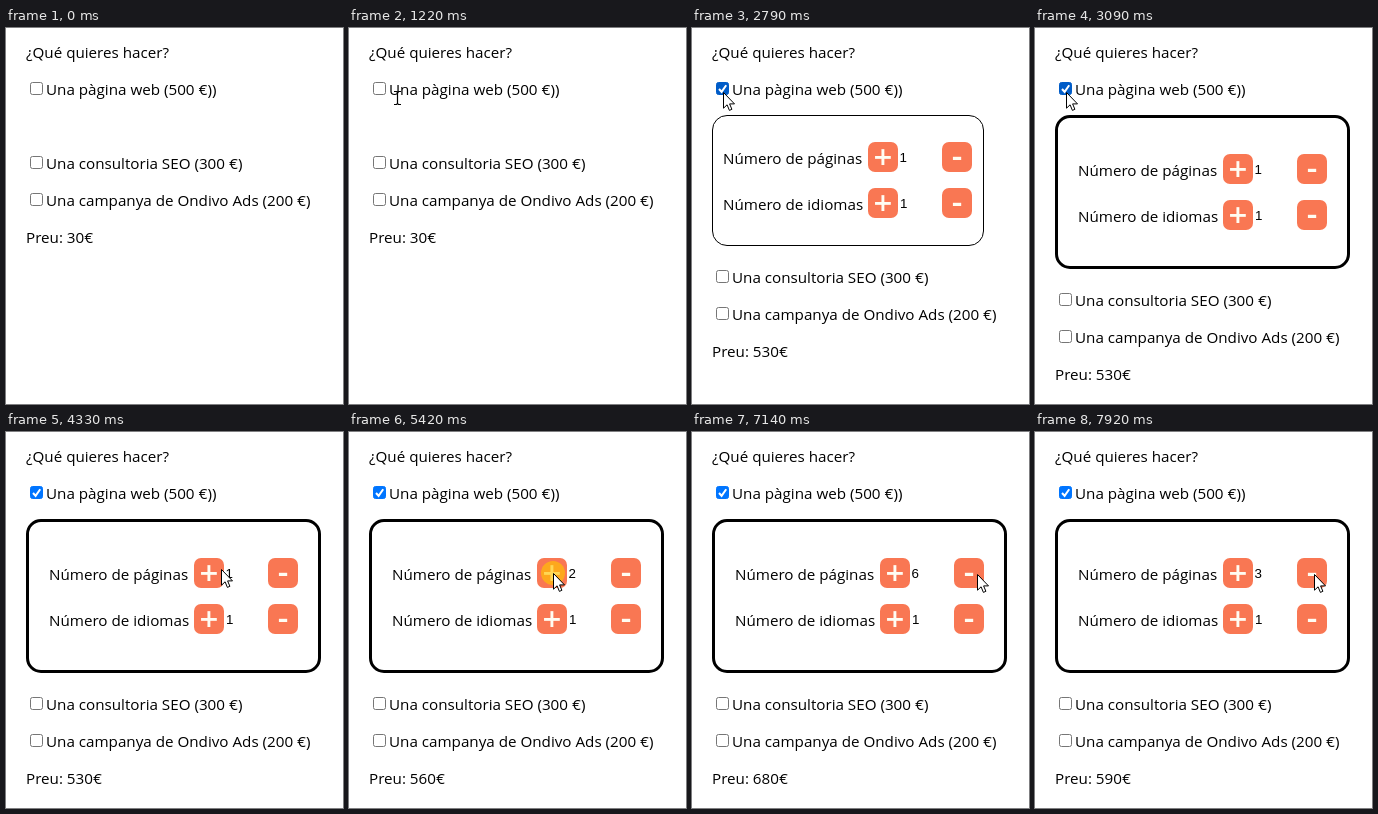
Recreate the animation shown at these times as an HTML page. Size 337 by 376 pixels, loop 8000 ms.

```html
<!DOCTYPE html>
<html lang="es">
<head>
<meta charset="utf-8">
<title>Presupuesto</title>
<style>
  html, body { margin: 0; width: 100%; height: 100%; overflow: hidden; background: #fff; }
  svg { display: block; width: 337px; height: 376px; }
  text { font: 15.2px "Open Sans", "Noto Sans", sans-serif; fill: #000; white-space: pre; }
  .sign { font-size: 33px; font-weight: 600; text-anchor: middle; fill: #fffcf2; }
  .count { font: 13.333px "Liberation Sans", Arial, sans-serif; }
  .button { fill: #f97753; }
  .box { fill: #fff; stroke: #767676; }
  .box.hover { stroke: #4f4f4f; }
  .box.checked { fill: #0075ff; stroke: #0075ff; }
  .box.checked.hover { fill: #005cc8; stroke: #005cc8; }
  .tick { fill: none; stroke: #fff; stroke-width: 2; }
  .press { fill: rgba(255, 195, 0, .65); }
  .arrow { fill: #fff; stroke: #000; stroke-linejoin: round; }
  .beam { fill: none; stroke: #000; stroke-width: 1.2; }
</style>
</head>
<body>
<svg viewBox="0 0 337 376">
  <defs>
    <g id="plus">
      <rect class="button" width="30" height="30" rx="7"/>
      <text class="sign" x="15" y="26.5">+</text>
    </g>
    <g id="minus">
      <rect class="button" width="30" height="30" rx="7"/>
      <text class="sign" x="15" y="25">-</text>
    </g>
  </defs>

  <text class="label" x="20" y="30">¿Qué quieres hacer?</text>
  <rect class="box" id="webBox" x="24.5" y="54.5" width="12" height="12" rx="2"/>
  <path class="tick" id="tick" d="M27 61l2.6 2.8L34.2 57.2"/>
  <text class="label" x="40" y="67">Una pàgina web (500 €))</text>

  <g id="panel">
    <rect id="frame" fill="#fff" stroke="#000"/>
    <g id="content">
      <text class="label" x="0" y="38">Número de páginas</text>
      <use href="#plus" x="145" y="16"/>
      <text class="count" id="pages" x="176.5" y="36">1</text>
      <use href="#minus" x="219" y="16"/>
      <text class="label" x="0" y="84">Número de idiomas</text>
      <use href="#plus" x="145" y="62"/>
      <text class="count" x="177" y="82">1</text>
      <use href="#minus" x="219" y="62"/>
    </g>
  </g>

  <g id="below">
    <rect class="box" x="24.5" y="128.5" width="12" height="12" rx="2"/>
    <text class="label" x="40" y="141">Una consultoria SEO (300 €)</text>
    <rect class="box" x="24.5" y="165.5" width="12" height="12" rx="2"/>
    <text class="label" x="40" y="178">Una campanya de Ondivo Ads (200 €)</text>
    <text class="label" id="price" x="20" y="215">Preu: 30€</text>
  </g>

  <g id="cursor">
    <circle class="press" id="press" r="12"/>
    <path class="arrow" id="arrow" d="M.5 .5V16.2L4.1 12.8L6.4 18.4L8.9 17.3L6.6 11.9H11.5Z"/>
    <path class="beam" id="beam" d="M-3-6.5H-.5L.5-5.5L1.5-6.5H4M.5-5.5V5.5M-3 6.5H-.5L.5 5.5L1.5 6.5H4"/>
  </g>
</svg>

<script>
const LOOP = 8000, STEP = 77, OPEN_AT = 2700, OPEN_FOR = 390;
const $ = id => document.getElementById(id);
const labels = [...document.querySelectorAll(".label")];

// time, x, y of the pointer
const path = [
  [600, 294, 333], [1220, 48, 70], [1370, 31, 68], [1445, 31, 68], [1520, 30, 68],
  [2000, 30, 68], [2090, 31, 64], [3705, 31, 64], [4018, 241, 174], [4330, 215, 137],
  [4413, 215, 137], [4960, 204, 141], [6673, 204, 141], [6750, 216, 142],
  [6812, 216, 142], [7140, 285, 142], [7217, 279, 142], [LOOP, 279, 142]
];

// press time, release time, change in the number of pages
const clicks = [
  [1770, 2000, 0], [2470, OPEN_AT, 0],
  [5110, 5190, 1], [5420, 5570, 1], [5740, 5890, 1], [6120, 6270, 1], [6520, 6670, 1],
  [7370, 7520, -1], [7690, 7770, -1], [7845, 7920, -1]
];

const show = (el, on) => el.setAttribute("display", on ? "inline" : "none");
const move = (el, x, y) => el.setAttribute("transform", `translate(${x} ${y})`);
const setAll = (el, attrs) => Object.entries(attrs).forEach(([k, v]) => el.setAttribute(k, v));
const inside = (x, y, r) => x >= r.left && x < r.right && y >= r.top && y < r.bottom;

function pointerAt(t) {
  const i = path.findIndex(([end]) => t < end);
  const [t0, x0, y0] = path[i - 1], [t1, x1, y1] = path[i];
  const count = Math.max(1, Math.round((t1 - t0) / STEP));
  const u = Math.floor((t - t0) / (t1 - t0) * count) / count;
  const ease = u * u * (3 - 2 * u);
  return [Math.round(x0 + (x1 - x0) * ease), Math.round(y0 + (y1 - y0) * ease)];
}

function drawPanel(t, open) {
  show($("panel"), open);
  if (!open) return move($("below"), 0, 0);
  const u = Math.min(1, Math.floor((t - OPEN_AT) / STEP) * STEP / OPEN_FOR);
  const grown = u > .98 ? 1 : 1 - (1 - u) ** 3.15;
  const inset = Math.round(46 * grown) / 2, border = Math.floor(3 * grown);
  const width = 249 + 2 * inset, height = 108 + 2 * inset;
  setAll($("frame"), {
    x: 20 + border / 2, y: 87 + border / 2,
    width: width - border, height: height - border,
    rx: 15 - border / 2, "stroke-width": border
  });
  move($("content"), 20 + Math.floor(inset), 87 + Math.floor(inset));
  move($("below"), 0, Math.round(height - 17));
}

function drawPointer(t) {
  const visible = t >= path[0][0];
  show($("cursor"), visible);
  if (!visible) return $("webBox").classList.remove("hover");
  const [x, y] = pointerAt(t);
  const overText = labels.some(el => inside(x, y, el.getBoundingClientRect()));
  move($("cursor"), x, y);
  show($("arrow"), !overText);
  show($("beam"), overText);
  show($("press"), clicks.some(([down, up]) => t >= down && t < up));
  $("webBox").classList.toggle("hover", inside(x, y, { left: 24, right: 37, top: 54, bottom: 67 }));
}

function draw(now) {
  const t = now % LOOP, open = t >= OPEN_AT;
  const pages = clicks.reduce((n, [, up, change]) => t >= up ? n + change : n, 1);
  $("pages").textContent = pages;
  $("price").textContent = `Preu: ${(open ? 500 : 0) + 30 * pages}€`;
  $("webBox").classList.toggle("checked", open);
  show($("tick"), open);
  drawPanel(t, open);
  drawPointer(t);
}

const start = performance.now();
function tick() {
  draw(performance.now() - start);
  requestAnimationFrame(tick);
}
tick();
</script>
</body>
</html>
```
